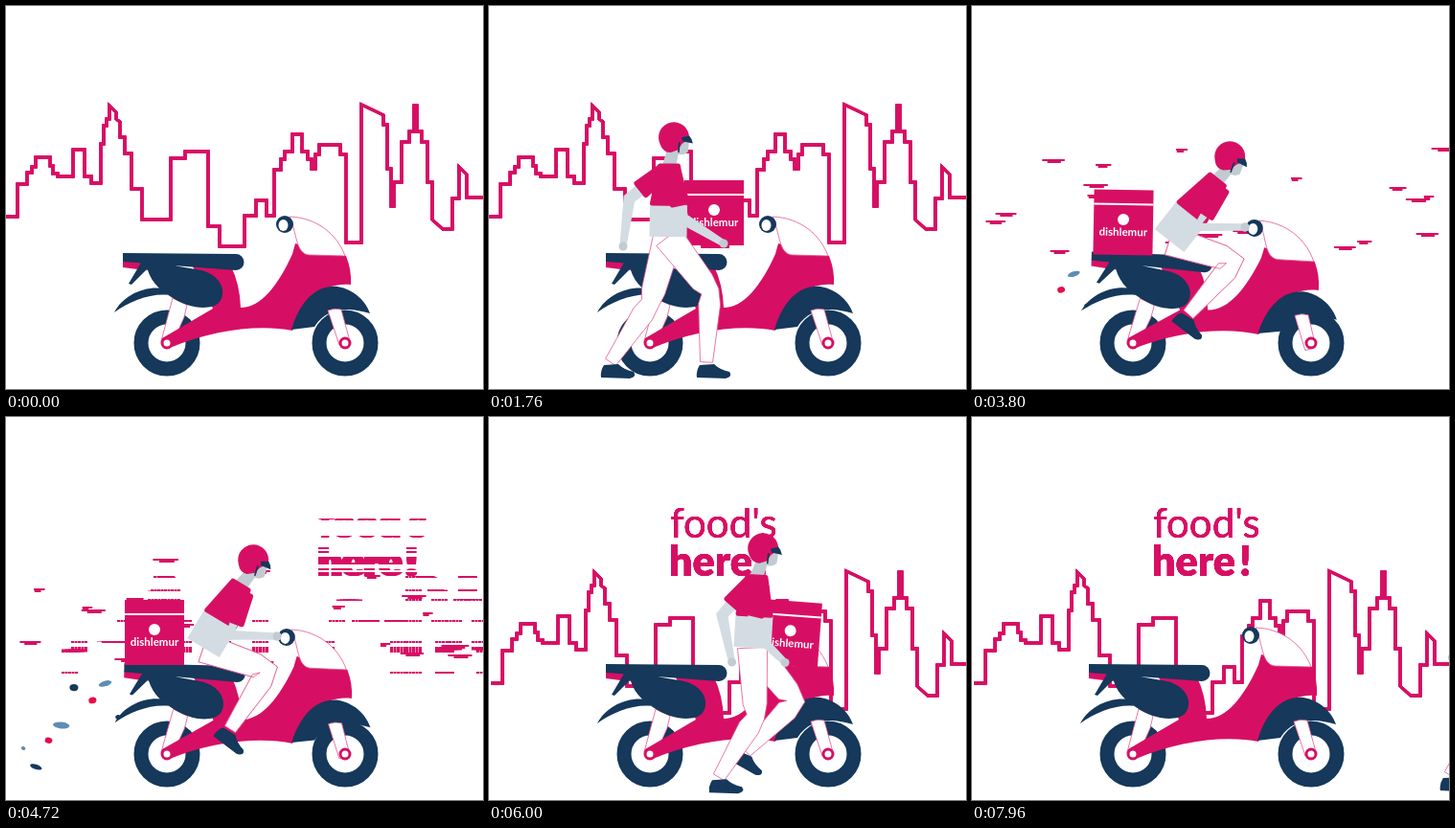
These frames come from a looping animation (498 px wide and 400 px high, 8 s). An HTML page:

```html
<!DOCTYPE html>
<html lang="en">
<head>
<meta charset="utf-8">
<title>Food delivery</title>
<style>
  html, body { margin: 0; width: 100%; height: 100%; overflow: hidden; background: #fff; }
  svg { display: block; width: 498px; height: 400px; }
  text { font-family: Lato, "Open Sans", sans-serif; }
  .pink { fill: #d70f64; }
  .navy { fill: #15385b; }
  .grey { fill: #d3dce2; }
  .skin { fill: #c1cbd1; }
  .cloth { fill: #fff; stroke: #e4568f; stroke-width: .8; stroke-linejoin: round; }
  .round { stroke: #d70f64; stroke-width: 5; stroke-linejoin: round; }
  .line { fill: none; stroke: #d70f64; stroke-width: 3; }
  .hub { fill: #fff; stroke: #d70f64; stroke-width: 3; }
  .tyre { fill: #fff; stroke: #15385b; stroke-width: 15; }
</style>
</head>
<body>
<svg viewBox="0 0 498 400" xmlns="http://www.w3.org/2000/svg">
  <defs>
    <path id="skyline" class="line" d="M0 220H12V186H22V174H27V168H31V158H46V167H49V175H54V178H70V150H82V178H89V185H99V144H102V125H105V118H108V104L115 111V118L119 121V137H124V154H131V191H142V223H172V159H187V152H211V230H223V251H249V219H261V203H272V219H280V171H287V160H291V152H299V134H309V152H315V160H319V170H323V155H327V145H349V155H355V247H371V103L394 114V124H398V170H402V209H405V184H413V142H421V131H426V104H429V131H434V142H440V184H445V223L456 233H466V201H473V168L481 176V200H498"/>
    <g id="slogan" class="pink">
      <text x="189" y="126" font-size="42">food's</text>
      <text x="188" y="166" font-size="43" font-weight="900">here<tspan dx="4">!</tspan></text>
    </g>
    <clipPath id="skyRows"><path/></clipPath>
    <clipPath id="textRows"><path/></clipPath>
  </defs>

  <g clip-path="url(#skyRows)"><g id="sky"></g></g>
  <g clip-path="url(#textRows)"><g id="words"></g></g>
  <path id="streaks" class="line" style="stroke-width:2"/>
  <g id="confetti"></g>

  <circle class="tyre" cx="168" cy="352" r="27"/>
  <circle class="tyre" cx="354" cy="352" r="27"/>
  <g id="frame">
    <path class="cloth" d="M174 305L189 312L186 325L174 352L162 350Z"/>
    <path class="pink" d="M122 266L150 268V276Q135 275 122 273ZM195 272L235 272Q244 290 245 315C266 315 284 292 299 259L302 248L355 261Q361 276 360 291C330 288 310 310 299 339C265 332 215 338 171 357Q160 357 163 347L216 316Z"/>
    <path class="navy" d="M113 320C123 301 148 289 174 297L178 303C154 298 132 307 113 320ZM141 268L152 270L131 291L128 290ZM146 266L204 276C224 281 231 298 223 309C214 319 190 316 171 303C154 293 147 279 146 266ZM122 258L240 259A8.5 8.5 0 0 1 240 276L122 267Z"/>
    <path class="navy" d="M298 338C308 305 326 291 346 293C364 296 376 309 380 321C360 315 336 313 322 335Z"/>
    <path class="cloth" d="M296 220C325 221 346 239 354 261L316 260C302 258 304 237 296 220Z"/>
    <path class="cloth" d="M336 318Q343 315 350 317L359 350L348 354Z"/>
    <circle class="navy" cx="291" cy="228" r="9"/>
    <ellipse cx="289.500" cy="229" rx="5" ry="6" fill="#fff"/>
  </g>
  <circle class="hub" cx="168" cy="352" r="5"/>
  <circle class="hub" cx="354" cy="352" r="5"/>

  <g id="rider">
    <g id="box">
      <path class="pink" d="M-31 -34H31V34H-31Z"/>
      <path d="M-31 -20H31V-18H-31Z" fill="#fff"/>
      <circle cy="-3" r="6" fill="#fff"/>
      <text y="14" font-size="11.500" font-weight="700" text-anchor="middle" fill="#fff">dishlemur</text>
    </g>
    <g id="body"></g>
    <g id="head">
      <path class="skin" d="M6 2L16 3L15 14Q10 19 3 16Z"/>
      <path class="pink" d="M16 -1A16 16 0 1 0 -14 7Q-11 15 -3 15L5 12Q8 4 16 1Z"/>
      <path class="navy" d="M8 -1L16 -3Q19 0 20 5L9 3ZM5 4H7L6 15H4.5Z"/>
    </g>
    <g id="arm"></g>
  </g>
</svg>
<script>
const LOOP = 8000, STEP = 40;
const $ = id => document.getElementById(id);
const clamp = v => Math.min(1, Math.max(0, v));
const ramp = (t, a, b) => clamp((t - a) / (b - a));
const smooth = u => u * u * (3 - 2 * u);
const mix = (a, b, u) => a + (b - a) * u;
const between = (a, b, u) => [mix(a[0], b[0], u), mix(a[1], b[1], u)];
const hash = n => { const s = Math.sin(n * 127.1 + 3.7) * 43758.5453; return s - Math.floor(s); };
const wrap = (v, n) => ((v % n) + n) % n;

// ---- rider geometry ----
function bend(a, b, upper, lower, side) {
  const dx = b[0] - a[0], dy = b[1] - a[1];
  const full = Math.hypot(dx, dy) || 1, d = Math.min(full, upper + lower - .1);
  const along = (upper * upper - lower * lower + d * d) / (2 * d);
  const out = side * Math.sqrt(Math.max(0, upper * upper - along * along));
  return [a[0] + (dx * along + dy * out) / full, a[1] + (dy * along - dx * out) / full];
}

function ribbon(cls, points, widths) {
  const left = [], right = [];
  points.forEach(([x, y], i) => {
    const a = points[Math.max(0, i - 1)], b = points[Math.min(points.length - 1, i + 1)];
    const dx = b[0] - a[0], dy = b[1] - a[1], k = widths[i] / 2 / (Math.hypot(dx, dy) || 1);
    left.push([x + dy * k, y - dx * k]);
    right.unshift([x - dy * k, y + dx * k]);
  });
  const d = left.concat(right).map(p => p.map(v => v.toFixed(1))).join('L');
  return `<path class="${cls}" d="M${d}Z"/>`;
}

function leg(hip, ankle) {
  const knee = bend(hip, ankle, 72, 74, 1);
  const tilt = Math.max(0, Math.min(35, (372 - ankle[1]) * 1.2));
  const joints = [hip, between(hip, knee, .82), knee, between(knee, ankle, .18), ankle];
  return ribbon('cloth', joints, [31, 25, 19, 23, 13]) +
    `<path class="navy" transform="translate(${ankle}) rotate(${tilt})" d="M-7 3L8 2Q14 8 24 10Q28 15 20 17L-10 16Q-11 9 -7 3Z"/>`;
}

function arm(shoulder, hand) {
  const elbow = bend(shoulder, hand, 47, 50, -1);
  return ribbon('grey', [shoulder, elbow, hand], [14, 13, 7]) +
    `<circle class="skin" cx="${hand[0]}" cy="${hand[1]}" r="4.500"/>` +
    ribbon('pink round', [shoulder, between(shoulder, elbow, .66)], [12, 16]);
}

// ---- poses: head, shoulder, hip, two ankles, two hands, box (x, y, angle) ----
function foot(phase) {
  const p = wrap(phase, 1);
  if (p < .5) return [40 - 200 * p, 372 + 6 * Math.sin(2 * Math.PI * p)];
  const u = p * 2 - 1;
  return [-60 + 100 * u ** 2.2, 372 - 32 * Math.sin(Math.PI * u)];
}

function walk(x, phase) {
  const c = Math.cos(2 * Math.PI * phase), a = foot(phase), b = foot(phase + .5);
  return [x + 9 - 3 * c, 138, x + 3 - 2 * c, 167, x, 241,
    x + a[0], a[1], x + b[0], b[1],
    x + 44 + 14 * c, 253 - 5 * c, x - 32 - 15 * c, 254 - 3 * c,
    x + 43 + 5 * c, 222 - 6 * c, 2.5 - 2.5 * c];
}

const walkIn = t => walk(187 + (t - 1760) * .16, (t - 1760) / 1220);
const walkOut = t => walk(275 + (t - 6000) * .139, .375 + (t - 6000) / 1250);
const mounting = [222, 134, 217, 166, 226, 243, 228, 377, 258, 322, 305, 218, 188, 255, 187, 222, 13];
const upright = [258, 150, 245, 176, 206, 241, 234, 326, 234, 326, 283, 229, 283, 229, 155, 225, 0];
const keys = [
  [1800, walkIn(1800)],
  [2480, mounting],
  [2560, mounting],
  [2920, [262, 153, 250, 178, 207, 243, 226, 322, 226, 322, 285, 231, 285, 231, 158, 226, 1]],
  [3800, [269, 158, 256, 182, 206, 245, 226, 322, 226, 322, 285, 231, 285, 231, 158, 226, 1]],
  [4720, upright],
  [5200, upright],
  [5600, [250, 134, 243, 168, 240, 243, 240, 375, 250, 335, 290, 228, 232, 258, 235, 226, 8]],
  [6000, walkOut(6000)]
];

function poseAt(t) {
  if (t <= 1800) return walkIn(t);
  if (t >= 6000) return walkOut(t);
  const i = keys.findIndex(k => k[0] > t), [t0, from] = keys[i - 1], [t1, to] = keys[i];
  const u = smooth(ramp(t, t0, t1));
  return from.map((v, n) => mix(v, to[n], u));
}

function drawRider(t) {
  $('rider').style.display = t < 160 ? 'none' : '';
  const p = poseAt(t), at = i => [p[i], p[i + 1]];
  const head = at(0), shoulder = at(2), hip = at(4);
  const waist = between(shoulder, hip, .53);
  $('box').setAttribute('transform', `translate(${at(14)}) rotate(${p[16]})`);
  $('head').setAttribute('transform', `translate(${head}) rotate(${(head[0] - hip[0]) * .25})`);
  $('body').innerHTML = arm([shoulder[0] - 5, shoulder[1] + 5], at(12)) +
    leg(hip, at(8)) + leg(hip, at(6)) +
    ribbon('skin', [[head[0], head[1] + 10], shoulder], [12, 14]) +
    ribbon('grey', [waist, hip], [39, 39]) +
    ribbon('pink round', [shoulder, waist], [19, 34]);
  $('arm').innerHTML = arm([shoulder[0] + 5, shoulder[1] + 9], at(10));
}

// ---- backdrop that breaks into horizontal slices ----
function smeared(id, source) {
  const group = $(id);
  group.innerHTML = `<use href="#${source}"/>`.repeat(5);
  return (dx, dy, spread) => {
    group.setAttribute('transform', `translate(${dx} ${dy})`);
    [...group.children].forEach((copy, i) => copy.setAttribute('x', (i - 2) * spread));
  };
}
const placeSky = smeared('sky', 'skyline'), placeWords = smeared('words', 'slogan');

function showRows(id, loss, weight = () => 1) {
  let d = loss ? 'M0 0' : 'M0 0H498V400H0Z';
  if (loss) for (let y = 90; y < 325; y += 2)
    if (hash(y) > loss * weight(y)) d += `M0 ${y}H498V${y + 2}H0Z`;
  $(id).firstElementChild.setAttribute('d', d);
}

function drawBackdrop(t) {
  const back = t > 4000;
  const loss = back ? 1 - ramp(t, 4480, 5160) ** 2 : 1 - (1 - ramp(t, 2720, 3400)) ** 2;
  placeSky(back ? 2 + 60 * loss : -60 * loss, back ? 58 : 0, 4 * loss);
  showRows('skyRows', loss);

  // the thin upper line of the slogan fills in later than the bold one
  const wordLoss = 1 - ramp(t, 4360, 5160);
  placeWords(251 * wordLoss, 0, 2 * wordLoss);
  showRows('textRows', wordLoss, y => t < 4360 ? 1 : 1.9 - (y - 95) / 45);

  const amount = Math.min(ramp(t, 2760, 3400), 1 - ramp(t, 4760, 5160));
  let d = '';
  for (let i = 0; i < 24; i++) {
    if (hash(i + 60) >= amount) continue;
    const x = wrap(hash(i) * 560 - t * (.25 + .2 * hash(i + 20)), 560) - 40;
    const y = Math.round(148 + hash(i + 40) * 118), w = 10 + hash(i + 80) * 20;
    d += `M${x.toFixed(1)} ${y}h${w.toFixed(1)}m-4 2h-${(w * .6).toFixed(1)}`;
  }
  $('streaks').setAttribute('d', d);
}

function drawConfetti(t) {
  const colors = ['#e70c4b', '#5e8db3', '#15385b'];
  let out = '';
  for (let i = 0; i < 9; i++) {
    const age = t - 3520 - i * 95, u = wrap(age, 900) / 900;
    if (age < 0 || t - u * 900 > 4760 || t > 5180) continue;
    const x = 132 - 125 * u, y = 308 + (hash(i + 7) - .5) * 130 * Math.sqrt(u);
    const r = 1.5 + 3 * Math.sin(Math.PI * u);
    out += `<ellipse rx="${r * (1 + i % 2)}" ry="${r * .8}" fill="${colors[i % 3]}" transform="translate(${x} ${y}) rotate(${-30 + 60 * u})"/>`;
  }
  $('confetti').innerHTML = out;
}

// the body of the scooter dips over its wheels during the ride
function drawScooter(t) {
  const riding = Math.min(ramp(t, 2640, 3000), 1 - ramp(t, 5160, 5400));
  const dip = riding * (1.1 + .7 * Math.cos((t - 3800) / 400 * 2 * Math.PI));
  $('frame').setAttribute('transform', `rotate(${dip} 168 352)`);
}

function draw(t) {
  drawBackdrop(t);
  drawConfetti(t);
  drawScooter(t);
  drawRider(t);
}

const start = performance.now();
function tick() {
  const t = (performance.now() - start) % LOOP;
  draw(Math.floor(t / STEP) * STEP);
  requestAnimationFrame(tick);
}
tick();
</script>
</body>
</html>
```
